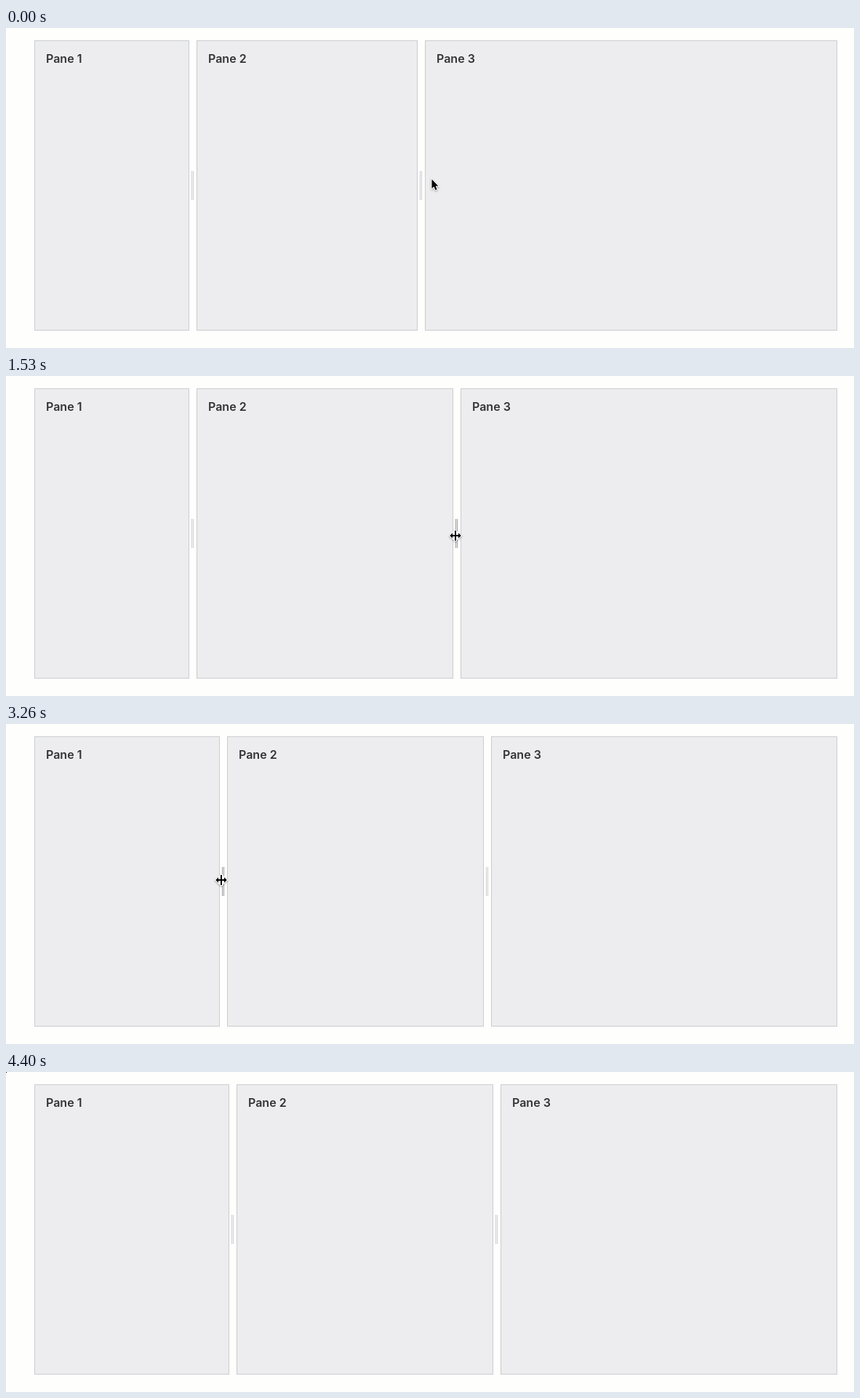
Recreate the animation shown at these times as an HTML page. Size 1166 by 441 pixels, loop 4730 ms.

```html
<!DOCTYPE html>
<html lang="en">
<head>
<meta charset="utf-8">
<title>Resizable panes</title>
<style>
  html, body { margin: 0; width: 100%; height: 100%; overflow: hidden; background: #fefefd; }
  svg { display: block; }
  .pane rect { fill: #ededef; stroke: #c9ccce; }
  .pane text { font: 600 16px Inter, "Liberation Sans", sans-serif; fill: #333; }
  .grip { fill: #cccdcd; }
  .grip.active { fill: #999; }
  .cursor { filter: drop-shadow(0 1px 1px rgba(0, 0, 0, .35)); }
  .cursor path { fill: #000; stroke: #fff; stroke-width: 2; paint-order: stroke; }
  .cursor .halo { fill: #fff; stroke: none; }
</style>
</head>
<body>
<svg width="1166" height="441" viewBox="0 0 1166 441">
  <g id="panes"></g>
  <g id="grips"></g>
  <g class="cursor" id="arrow">
    <path d="M.5 .5V13.2L3.4 10.5 5.5 15.3 7.6 14.4 5.6 9.7H9.4Z"/>
  </g>
  <g class="cursor" id="resize">
    <path class="halo" d="M-9 0L0 -8 9 0 0 8Z"/>
    <path d="M-1 -7H1V-1H4V-3.7L7.8 0 4 3.7V1H1V7H-1V1H-4V3.7L-7.8 0-4 -3.7V-1H-1Z"/>
  </g>
  <rect id="parked" width="1" height="1" fill="#000"/>
</svg>
<script>
const LOOP = 4730, LEFT = 39, RIGHT = 1143, TOP = 17, BOTTOM = 417, GAP = 10;
const HOME = { x: 585, y: 208 }, EXIT = 4400;

// Eased pointer moves, each starting where the last one ended
const moves = [
  { from: 20, to: 430, x: 569, y: 214 },
  { from: 580, to: 960, x: 691, y: 214 },
  { from: 1110, to: 1360, x: 618, y: 220 },
  { from: 1630, to: 1840, x: 472, y: 219 },
  { from: 1840, to: 2030, x: 618, y: 217 },
  { from: 2040, to: 2460, x: 243, y: 217 },
  { from: 2610, to: 2930, x: 254, y: 216 },
  { from: 3110, to: 3500, x: 383, y: 214 },
  { from: 3640, to: 3830, x: 312, y: 219 },
  { from: 3900, to: 4160, x: 309, y: 219 },
  { from: 4180, to: EXIT, x: 368, y: 450 }
];

const byId = id => document.getElementById(id);
const clamp = (v, lo, hi) => Math.min(hi, Math.max(lo, v));
const ease = k => (1 - Math.cos(Math.PI * k)) / 2;

function add(parent, tag, attrs) {
  const el = document.createElementNS("http://www.w3.org/2000/svg", tag);
  for (const k in attrs) el.setAttribute(k, attrs[k]);
  return parent.appendChild(el);
}

const panes = [1, 2, 3].map(n => {
  const g = add(byId("panes"), "g", { class: "pane" });
  const rect = add(g, "rect", { x: .5, y: TOP + .5, height: BOTTOM - TOP - 1 });
  add(g, "text", { x: 16, y: 48 }).textContent = "Pane " + n;
  return { g, rect };
});

const grips = [0, 1].map(() => {
  const g = add(byId("grips"), "g", { class: "grip" });
  for (const x of [3, 5]) add(g, "rect", { x, y: 197, width: 1, height: 40 });
  return g;
});

function pointerAt(t) {
  let { x, y } = HOME;
  for (const m of moves) {
    const k = ease(clamp((t - m.from) / (m.to - m.from), 0, 1));
    x += (m.x - x) * k;
    y += (m.y - y) * k;
  }
  return { x: Math.round(x), y: Math.round(y) };
}

// Distance a divider has been dragged between two times
const dragged = (t, from, to) => pointerAt(clamp(t, from, to)).x - pointerAt(from).x;

const place = (el, x, y = 0) => el.setAttribute("transform", `translate(${x} ${y})`);
const show = (el, on) => { el.style.display = on ? "" : "none"; };

function render(t) {
  const { x, y } = pointerAt(t);
  const shift = dragged(t, 3000, 4170);
  const second = 262 + shift;
  const third = 576 + dragged(t, 500, 2035) + shift;

  const starts = [LEFT, second, third];
  const ends = [second - GAP, third - GAP, RIGHT];
  panes.forEach(({ g, rect }, i) => {
    place(g, starts[i]);
    rect.setAttribute("width", ends[i] - starts[i] - 1);
  });

  const parked = t >= EXIT;
  let over = false;
  grips.forEach((g, i) => {
    const hit = !parked && y < BOTTOM && x >= ends[i] && x < ends[i] + GAP;
    place(g, ends[i]);
    g.classList.toggle("active", hit);
    over = over || hit;
  });

  place(byId("arrow"), x, y);
  place(byId("resize"), x, y);
  show(byId("arrow"), !over && !parked);
  show(byId("resize"), over);
  show(byId("parked"), parked);
}

const began = performance.now();
function tick() {
  render((performance.now() - began) % LOOP);
  requestAnimationFrame(tick);
}
tick();
</script>
</body>
</html>
```
